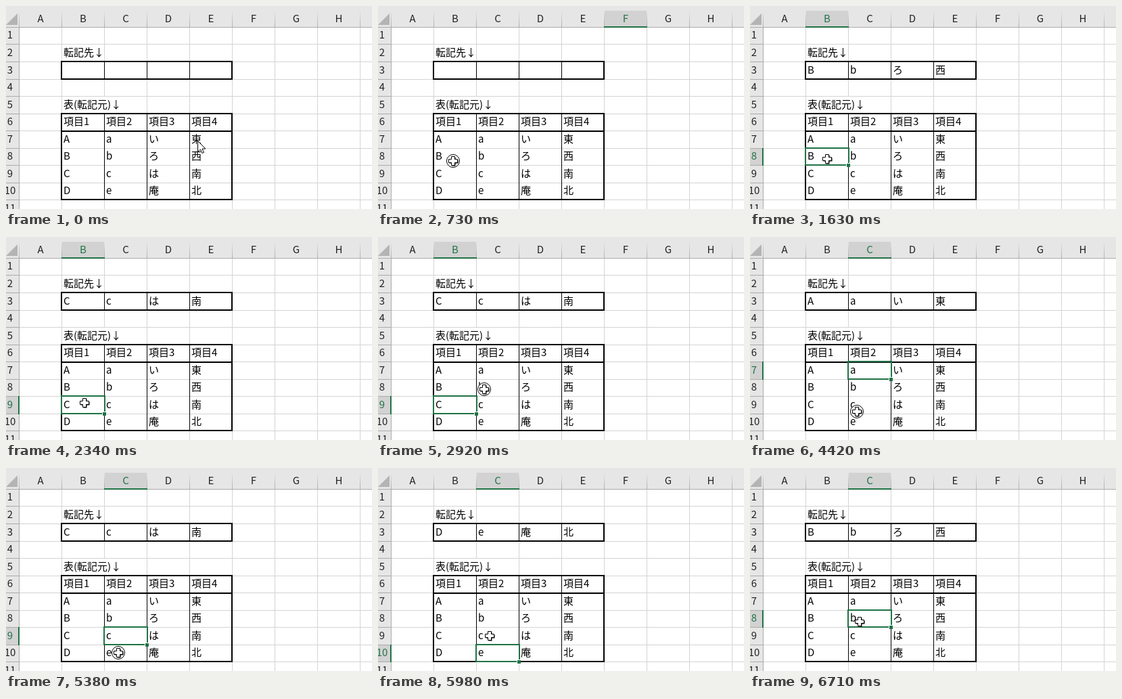
Recreate the animation shown at these times as an HTML page with a canvas. Size 541x300 px, loop 6.81 s.

```html
<!DOCTYPE html>
<html lang="ja">
<head>
<meta charset="utf-8">
<style>
html, body { margin: 0; overflow: hidden; }
canvas { display: block; }
</style>
</head>
<body>
<canvas id="stage" width="541" height="300"></canvas>
<script>
const ctx = document.getElementById('stage').getContext('2d');
const LOOP = 6810, COPY_LAG = 180;
const GREEN = '#217346', GRID = '#d4d4d4', HEAD = '#e6e6e6', ACTIVE = '#d2d2d2', EDGE = '#ababab';
const LETTERS = 'ABCDEFGHI';
const items = ['Aaい東', 'Bbろ西', 'Ccは南', 'De庵北'];
const colX = c => 19 + 63 * c;                             // left edge, A = 0
const rowY = r => Math.round(30.98 + 25.51 * (r - 1));     // top edge, rows from 1
const textY = r => rowY(r + 1) - 13.5;

// The pointer travels from start to end; with a cell, it presses there until release.
const moves = [
  { start: 60, end: 700, x: 111, y: 229, release: 910, cell: 'B8' },
  { start: 910, end: 1330, x: 114, y: 226 },
  { start: 1690, end: 1870, x: 116, y: 245, release: 2120, cell: 'B9' },
  { start: 2420, end: 2860, x: 157, y: 225, release: 2980, cell: 'C8' },
  { start: 3220, end: 3580, x: 158, y: 198, release: 3700, cell: 'C7' },
  { start: 3940, end: 4400, x: 158, y: 258, release: 4480, cell: 'C9' },
  { start: 4900, end: 5340, x: 166, y: 273, release: 5500, cell: 'C10' },
  { start: 5740, end: 6150, x: 164, y: 233, release: 6280, cell: 'C8' },
  { start: 6340, end: 6460, x: 162, y: 227 }
];
const clicks = moves.filter(m => m.cell);
const lastCell = t => clicks.filter(m => m.release <= t).pop()?.cell;
const rowOf = cell => +cell.slice(1);

function pointer(t) {
  let x = 283, y = 199;
  for (const m of moves) {
    const u = Math.min(1, Math.max(0, (t - m.start) / (m.end - m.start)));
    const ease = u * u * (3 - 2 * u);
    x += (m.x - x) * ease;
    y += (m.y - y) * ease;
  }
  return [Math.round(x), Math.round(y)];
}

function rect(x, y, w, h, color) {
  ctx.fillStyle = color;
  ctx.fillRect(x, y, w, h);
}

function frame(x, y, w, h, color) {
  ctx.strokeStyle = color;
  ctx.lineWidth = 2;
  ctx.strokeRect(x, y, w, h);
}

function text(s, x, y, align = 'left', color = '#000') {
  ctx.font = '350 15px "Noto Sans CJK JP", "Noto Sans CJK", sans-serif';
  ctx.textBaseline = 'middle';
  ctx.textAlign = align;
  ctx.fillStyle = color;
  ctx.fillText(s, x, y);
}

const write = (s, c, r) => text(s, colX(c) + 3, textY(r));

function paint(fill, stroke) {
  ctx.fillStyle = fill;
  ctx.fill();
  if (!stroke) return;
  ctx.strokeStyle = stroke;
  ctx.lineWidth = 1;
  ctx.stroke();
}

function shape(points, x, y, fill, stroke) {
  ctx.beginPath();
  for (const [px, py] of points) ctx.lineTo(x + px, y + py);
  ctx.closePath();
  paint(fill, stroke);
}

function headers(col, row) {
  rect(0, 0, 541, 31, HEAD);
  rect(0, 31, 19, 269, HEAD);
  const fade = ctx.createLinearGradient(0, 7, 0, 31);
  fade.addColorStop(0, HEAD);
  fade.addColorStop(1, EDGE);
  for (let c = 0; c < 9; c++) {
    const x = colX(c), on = c === col;
    if (on) rect(x, 7, 63, 24, ACTIVE);
    rect(x, 7, 1, 24, fade);
    if (c < 8) text(LETTERS[c], x + 32, 18, 'center', on ? GREEN : '#222');
  }
  for (let r = 1; r < 12; r++) {
    const y = rowY(r), on = r === row;
    if (on) rect(0, y, 19, rowY(r + 1) - y, ACTIVE);
    rect(0, y, 19, 1, EDGE);
    text(r, 6, textY(r), 'center', on ? GREEN : '#222');
  }
  rect(0, 31, 541, 1, EDGE);
  rect(19, 31, 1, 269, EDGE);
  shape([[17, 11], [17, 28], [0, 28]], 0, 0, '#b4b4b4');
}

function box(top, bottom) {
  const y = rowY(top), h = rowY(bottom + 1) - y;
  for (let c = 2; c < 5; c++) rect(colX(c), y, 1, h, '#000');
  frame(82, y, 252, h, '#000');
}

function sheet(copied) {
  rect(0, 0, 541, 300, '#fff');
  for (let c = 1; c < 9; c++) rect(colX(c), 31, 1, 269, GRID);
  for (let r = 2; r < 12; r++) rect(19, rowY(r), 522, 1, GRID);
  // the long label covers the grid line it runs across
  rect(colX(2), rowY(5) + 1, 1, 24, '#fff');
  box(3, 3);
  box(6, 10);
  rect(82, rowY(7), 252, 2, '#000');
  write('転記先↓', 1, 2);
  write('表(転記元)↓', 1, 5);
  for (let c = 0; c < 4; c++) {
    write('項目' + (c + 1), c + 1, 6);
    items.forEach((item, i) => write(item[c], c + 1, 7 + i));
    if (copied) write(items[rowOf(copied) - 7][c], c + 1, 3);
  }
}

function selection(col, row) {
  const x = colX(col), y = rowY(row), right = x + 63, bottom = rowY(row + 1);
  rect(x, 30, 64, 2, GREEN);
  rect(18, y, 2, bottom - y + 1, GREEN);
  frame(x, y, 64, bottom - y, GREEN);
  rect(right - 3, bottom - 3, 6, 6, '#fff');
  rect(right - 2, bottom - 2, 5, 5, GREEN);
}

function plus(x, y, fill, stroke) {
  const a = 2.5, b = 6.5;
  shape([[-a, -b], [a, -b], [a, -a], [b, -a], [b, a], [a, a],
    [a, b], [-a, b], [-a, a], [-b, a], [-b, -a], [-a, -a]], x, y, fill, stroke);
}

function cursor(t) {
  const [x, y] = pointer(t);
  if (t < 120) {
    shape([[0, 0], [0, 16], [4, 12.5], [6.5, 18], [9, 17], [6.5, 11.5], [11.5, 11.5]],
      x + 0.5, y + 0.5, '#fff', '#000');
    return;
  }
  if (clicks.some(m => t >= m.end && t < m.release)) {
    ctx.beginPath();
    ctx.arc(x, y, 9.5, 0, 2 * Math.PI);
    paint('#fff', '#000');
  }
  plus(x + 1, y + 1, '#000');
  plus(x, y, '#fff', '#000');
}

function draw(t) {
  // before the first click the selected cell is below the visible rows
  const cell = lastCell(t) || (t >= 60 && 'F20');
  const col = cell ? LETTERS.indexOf(cell[0]) : -1;
  const row = cell ? rowOf(cell) : 0;
  sheet(lastCell(t - COPY_LAG));
  headers(col, row);
  if (cell) selection(col, row);
  cursor(t);
}

function tick() {
  draw(performance.now() % LOOP);
  requestAnimationFrame(tick);
}
tick();
</script>
</body>
</html>
```
